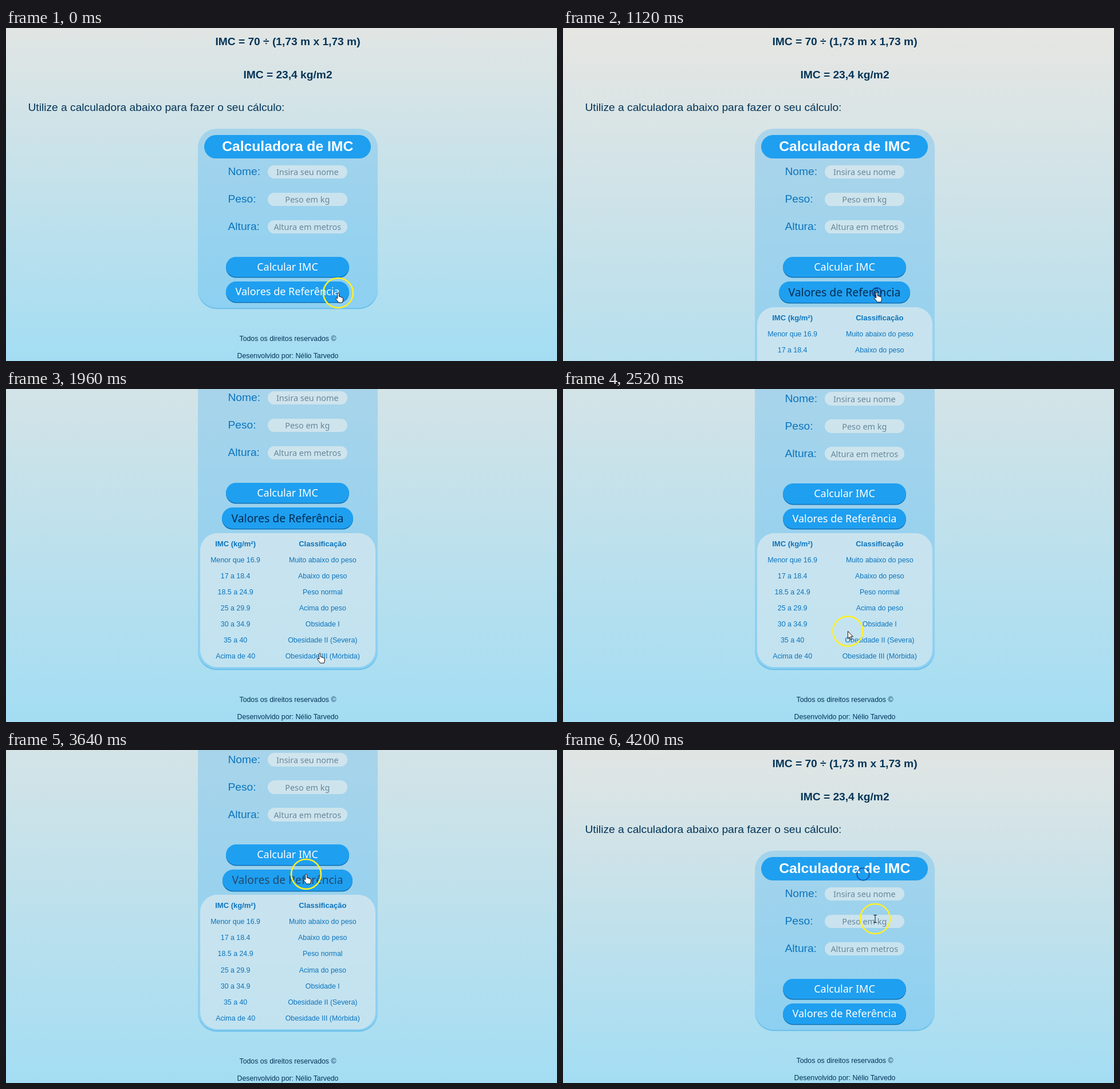
Write an HTML page that moves like this. It is 962 px wide and 582 px high and loops after 4340 ms.

```html
<!DOCTYPE html>
<html lang="pt">
<head>
<meta charset="utf-8">
<title>Calculadora de IMC</title>
<style>
  html, body { margin: 0; width: 100%; height: 100%; overflow: hidden; }
  #stage { position: relative; width: 962px; height: 582px; overflow: hidden;
    font-family: "Liberation Sans", Arial, sans-serif; color: #043457; }
  #stage div { position: absolute; white-space: nowrap; }
  #page, .layer { left: 0; width: 962px; }
  .text { width: 500px; height: 30px; line-height: 30px; text-align: center; }
  .blue { color: #0b74bd; }
  #card { left: 335px; top: 176px; width: 313.5px; border-radius: 33px;
    background: rgba(67,176,240,.3); box-shadow: 0 2.3px 0 #6dc0ea; }
  #title { left: 346px; top: 187px; width: 291px; height: 40.5px; border-radius: 21px; background: #1f9ff0; }
  .field { left: 457px; width: 138.5px; height: 23.5px; border-radius: 12px; background: rgba(250,245,240,.5); }
  .ui, .button { font-family: "Noto Sans", "Open Sans", sans-serif; }
  .ui { color: #66879a; }
  .button { left: 384px; width: 215px; height: 35.5px; line-height: 35.5px; border-radius: 19px; text-align: center;
    font-size: 18px; color: #fff; background: #1f9ff0; box-shadow: 0 1.6px 0 #0d70b4; }
  #table { left: 338.5px; top: 486px; width: 306.5px; height: 234.5px; border-radius: 30px;
    background: rgba(250,245,240,.5); }
  svg { position: absolute; left: 0; top: 0; }
</style>
</head>
<body>
<div id="stage">
  <div id="page">
    <div id="card"></div>
    <div id="title"></div>
    <div class="button" style="top:399.5px">Calcular IMC</div>
    <div class="button" id="values" style="top:443px">Valores de Referência</div>
    <div class="layer" id="results"><div id="table"></div></div>
    <div class="layer" id="footer"></div>
  </div>
  <svg width="962" height="582" fill="none">
    <circle id="ripple" stroke="#0b3c98" stroke-width="2"/>
    <g id="pointer">
      <path id="shape" stroke="#111" stroke-linejoin="round"/>
      <circle id="halo" r="26" stroke="#fff028" stroke-width="2.6"/>
    </g>
  </svg>
</div>
<script>
const $ = id => document.getElementById(id);
const LOOP = 4340, STEP = 140;
const TABLE_SPACE = 234.4, HOVER_SPACE = 1.6;
const OPEN = 980, CLOSE = 3920;

function add(parent, className, style, content = '') {
  const el = document.createElement('div');
  el.className = className;
  el.textContent = content;
  Object.assign(el.style, style);
  parent.append(el);
  return el;
}

// Text centred on (x, y)
function text(parent, content, x, y, size, className = '', style = {}) {
  return add(parent, 'text ' + className,
    { left: x - 250 + 'px', top: y - 15 + 'px', fontSize: size + 'px', ...style }, content);
}

const page = $('page'), bold = { fontWeight: 'bold' };
text(page, 'IMC = 70 ÷ (1,73 m x 1,73 m)', 492, 23.5, 19.2, '', bold);
text(page, 'IMC = 23,4 kg/m2', 492, 81.5, 19.2, '', bold);
text(page, 'Utilize a calculadora abaixo para fazer o seu cálculo:', 288.5, 138.5, 19.2,
  '', { textAlign: 'left', left: '38.5px' });
text(page, 'Calculadora de IMC', 491.7, 207, 24.7, '', { ...bold, color: '#fff' });

[['Nome:', 'Insira seu nome'], ['Peso:', 'Peso em kg'], ['Altura:', 'Altura em metros']]
  .forEach(([label, hint], i) => {
    const y = 251 + 48 * i;
    text(page, label, 0, y, 19.2, 'blue', { textAlign: 'left', left: '387.5px' });
    add(page, 'field', { top: y - 11.3 + 'px' });
    text(page, hint, 526.3, y + 1, 14.4, 'ui');
  });

[['IMC (kg/m²)', 'Classificação'], ['Menor que 16.9', 'Muito abaixo do peso'],
 ['17 a 18.4', 'Abaixo do peso'], ['18.5 a 24.9', 'Peso normal'],
 ['25 a 29.9', 'Acima do peso'], ['30 a 34.9', 'Obsidade I'],
 ['35 a 40', 'Obesidade II (Severa)'], ['Acima de 40', 'Obesidade III (Mórbida)']]
  .forEach((row, i) => row.forEach((cell, col) =>
    text($('results'), cell, col ? 552.8 : 400.6, 505.1 + 28.1 * i, i ? 12.4 : 13,
      'blue', i ? {} : bold)));

text($('footer'), 'Todos os direitos reservados ©', 492, 543, 12.3);
text($('footer'), 'Desenvolvido por: Nélio Tarvedo', 492, 573, 12.3);

const shapes = {
  hand: 'M-1.4 10V1.2Q-1.4-.2 0-.2T1.4 1.2V6.4Q3.6 5.4 4 7.2Q6 6.4 6.3 8.2Q8.4 7.6 8.4 9.6V12Q8.4 14 7.2 17H.6Q-1.6 13.5-4 11Q-5 9.5-3.6 9Q-2.4 9-1.4 10Z',
  arrow: 'M0 0V13L3 10.2L5.2 15L7.2 14L5 9.4H9Z',
  beam: 'M-3-6.5H3M0-6.5V6.5M-3 6.5H3'
};

// Keys are [time, value, ...]
const path = [[0, 580, 463], [560, 548, 462], [2240, 548, 462], [2660, 472, 404], [3080, 428, 375],
  [3500, 523, 223], [3640, 524, 217], [3920, 524, 217], [4200, 545, 295]];
const hovering = [[0, 0], [140, .65], [280, 1], [2240, 1], [2380, .35], [2520, 0],
  [3500, 0], [3640, .87], [3780, 1], [3920, 1], [4060, .35], [4200, 0]];
const scrolling = [[1540, 0], [1680, 32], [1820, 146], [1960, 236], [2240, 236], [2520, 234.4]];

function at(keys, t, i = 1) {
  const next = keys.findIndex(k => k[0] > t);
  if (next < 0) return keys[keys.length - 1][i];
  if (!next) return keys[0][i];
  const a = keys[next - 1], b = keys[next];
  return a[i] + (b[i] - a[i]) * (t - a[0]) / (b[0] - a[0]);
}

const mix = (a, b, k) => a + (b - a) * k;

function drawPage(t) {
  const open = t >= OPEN && t < CLOSE;
  const h = at(hovering, t);
  const grow = HOVER_SPACE * h, extra = grow + (open ? TABLE_SPACE : 0);

  page.style.top = (open ? -at(scrolling, t) : 0) + 'px';
  page.style.height = 584 + extra + 'px';
  page.style.background = `linear-gradient(to top, #a3ddf3, #e7e6e2 ${open ? 825 : 640}px)`;
  $('card').style.height = 313 + extra + 'px';
  $('results').style.display = open ? '' : 'none';
  $('results').style.top = grow + 'px';
  $('footer').style.top = extra + 'px';

  const height = 35.5 + grow + 'px';
  Object.assign($('values').style, {
    left: 384 - 7.2 * h + 'px', width: 215 + 14.4 * h + 'px', height, lineHeight: height,
    fontSize: 18 + 1.4 * h + 'px',
    color: `rgb(${mix(255, 3, h)},${mix(255, 45, h)},${mix(255, 82, h)})`
  });
}

function drawPointer(t) {
  const x = at(path, t), y = at(path, t, 2);
  const kind = t >= 4200 ? 'beam' : t < 2240 || (t >= 3430 && t < 4060) ? 'hand' : 'arrow';
  $('pointer').setAttribute('transform', `translate(${x} ${y})`);
  $('shape').setAttribute('d', shapes[kind]);
  $('shape').setAttribute('fill', kind === 'beam' ? 'none' : '#fff');
  const still = (t >= OPEN && t < 2240) || (t >= CLOSE && t < 4060);
  $('halo').setAttribute('opacity', still ? 0 : 1);

  const second = t >= 3840, age = t - (second ? 3840 : OPEN);
  const ripple = { cx: second ? 524 : 548, cy: second ? 217 : 462,
    r: Math.max(0, 6.3 + age * .0125), opacity: age < 0 || age > 800 ? 0 : 1 - age / 900 };
  for (const key in ripple) $('ripple').setAttribute(key, ripple[key]);
}

function frame() {
  const t = Math.floor(performance.now() % LOOP / STEP) * STEP;
  drawPage(t);
  drawPointer(t);
  requestAnimationFrame(frame);
}
frame();
</script>
</body>
</html>
```
